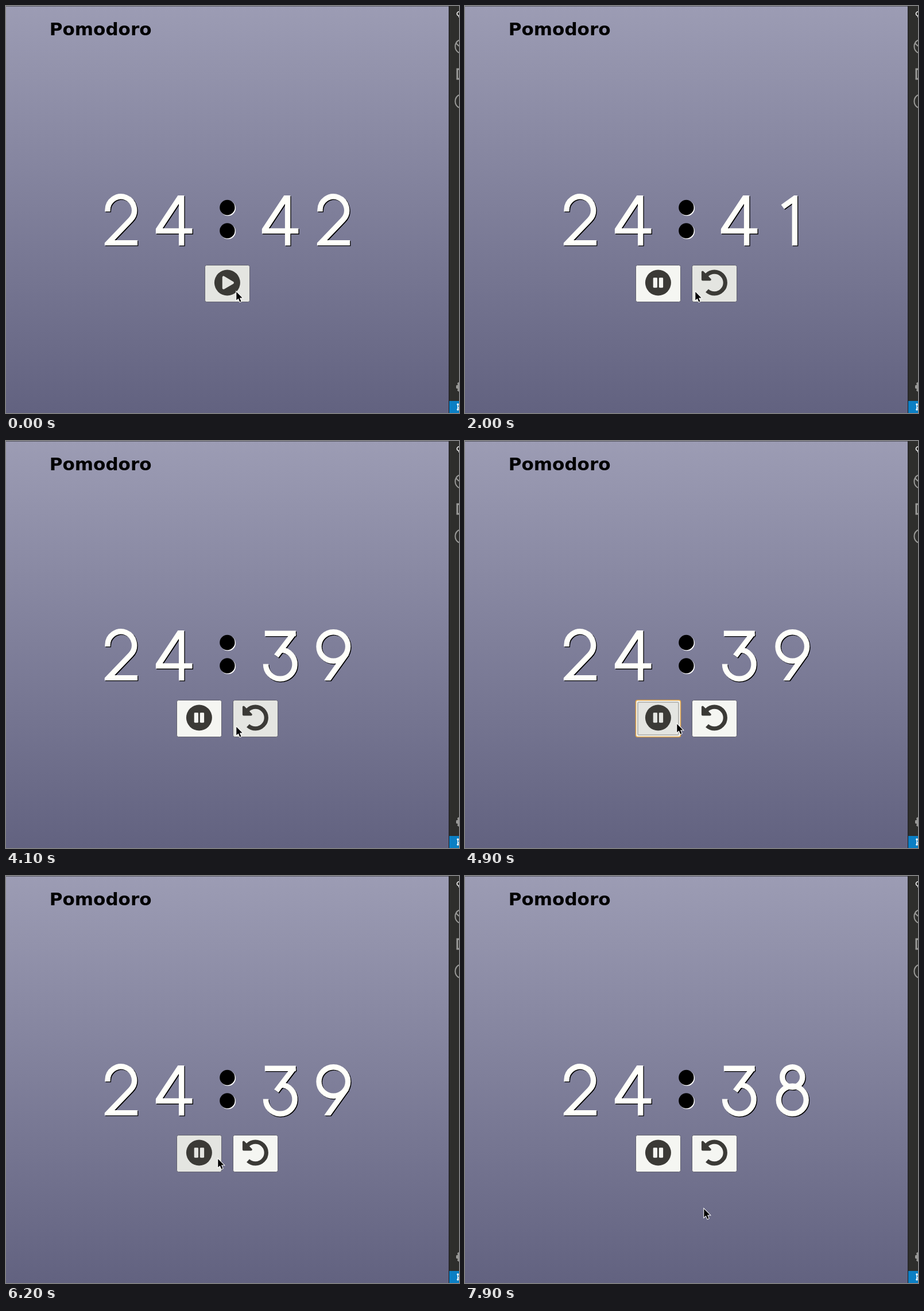
An HTML page with a canvas for the animation above (8 s loop, 789 by 709 pixels).

```html
<!DOCTYPE html>
<html lang="en">
<head>
<meta charset="utf-8">
<title>Pomodoro</title>
<style>
html, body { margin: 0; width: 100%; height: 100%; overflow: hidden; background: #626280; }
canvas { display: block; }
</style>
</head>
<body>
<canvas id="stage" width="789" height="709"></canvas>
<script>
const ctx = document.getElementById('stage').getContext('2d');
const LOOP = 8000, ICON = '#3b3a36', PLAIN = '#f5f6f2', HOVER = '#e4e5e1';

// Digits are stroked around x = 0; clip is [left, top, right, bottom].
const digits = {
  0: { d: 'M-26 355.5a26 22.7 0 0 1 52 0V392a26 22.7 0 0 1-52 0ZM-21 404L21 347' },
  1: { d: 'M-17 350L4 335V418', clip: [-20, 330, 10, 417.3] },
  2: { d: 'M-23.3 358V356.3A23.3 23.8 0 1 1 16.5 372.5L-22 412.6H29', clip: [-28.5, 320, 29, 417.3] },
  3: { d: 'M-27 335.3H27M24 334L-7 374.5M2 363.8A25.3 25.3 0 1 1-25.3 388.5' },
  4: { d: 'M32 391.9H-28.8L12.8 329V418', clip: [-32, 330, 31.7, 417.3] },
  8: { d: 'M17.5 350.3a17.5 17.5 0 1 1-35 0a17.5 17.5 0 1 1 35 0ZM24 390a24 24 0 1 1-48 0a24 24 0 1 1 48 0Z' },
  9: { d: 'M25.3 358a25.3 25.3 0 1 1-50.6 0a25.3 25.3 0 1 1 50.6 0ZM23 370L-12 419', clip: [-40, 320, 40, 417.3] }
};

const seconds = [[0, 42], [2000, 41], [3100, 40], [4100, 39], [7100, 38]];
const pointer = [
  [0, 401, 498], [4600, 376, 494], [4700, 369, 493],
  [6600, 376, 508], [6700, 389, 540], [6800, 403, 572], [6900, 411, 586],
  [7200, 412, 584], [7300, 413, 582], [7400, 414, 581], [7800, 415, 580], [7900, 416, 580]
];
const at = (steps, t) => steps.findLast(s => s[0] <= t);
const within = (t, a, b) => t >= a && t < b;

function rect(x, y, w, h, color) {
  ctx.fillStyle = color;
  ctx.fillRect(x, y, w, h);
}

function box(x, y, w, h, r, fill, line, width = 1) {
  ctx.beginPath();
  ctx.roundRect(x, y, w, h, r);
  if (fill) { ctx.fillStyle = fill; ctx.fill(); }
  if (line) { ctx.strokeStyle = line; ctx.lineWidth = width; ctx.stroke(); }
}

function disc(x, y, r, color) {
  ctx.fillStyle = color;
  ctx.beginPath();
  ctx.arc(x, y, r, 0, 7);
  ctx.fill();
}

function trace(d, color, width) {
  ctx.strokeStyle = color;
  ctx.lineWidth = width;
  ctx.stroke(new Path2D(d));
}

function shape(d, color) {
  ctx.fillStyle = color;
  ctx.fill(new Path2D(d));
}

function rounded(d, color, width) {
  ctx.lineJoin = 'round';
  shape(d, color);
  trace(d, color, width);
  ctx.lineJoin = 'miter';
}

function digit(n, x) {
  const { d, clip } = digits[n];
  for (const [shift, color] of [[1.3, '#000'], [0, '#fffffa']]) {
    ctx.save();
    ctx.translate(x + shift, shift);
    if (clip) {
      const [l, t, r, b] = clip;
      ctx.beginPath();
      ctx.rect(l, t, r - l, b - t);
      ctx.clip();
    }
    trace(d, color, 9.4);
    ctx.restore();
  }
}

function backdrop() {
  const g = ctx.createLinearGradient(0, 0, 0, 709);
  g.addColorStop(0, '#9c9cb4');
  g.addColorStop(1, '#626280');
  rect(0, 0, 771, 709, g);
  rect(0, 0, 771, 1, '#55555f');
  ctx.fillStyle = '#000';
  ctx.font = 'bold 31px "DejaVu Sans", sans-serif';
  ctx.fillText('Pomodoro', 75.8, 51);
}

function sidebar() {
  const grey = '#9a9a98';
  rect(771, 0, 18, 709, '#2e2e2c');
  rect(771, 0, 1, 709, '#1c1c20');
  rect(772, 688, 17, 21, '#0b7fc4');
  trace('M789 10a3.5 3.5 0 0 0 0 7V20', '#f4f4f4', 1.7);
  trace('M789 59.5a12.5 12.5 0 0 0 0 22M784 65L789 70', grey, 2);
  trace('M789 110H786V127H789', grey, 3);
  trace('M789 155a12.5 12.5 0 0 0 0 22', grey, 2);
  shape('M789 655L786 657L787 660L784 661V666L787 667L786 670L789 672Z', grey);
  trace('M787 694V703M787 700H789', '#fff', 1.5);
  disc(787, 694, 1.8, '#fff');
  disc(787, 703, 1.8, '#fff');
}

// Icons are drawn around the button's centre.
function button(x, icon, hover, focus) {
  const face = hover ? HOVER : PLAIN;
  box(x, 451.5, 78, 64, 3, face, '#62626f');
  if (focus) {
    box(x, 451.5, 78, 64, 3, PLAIN, '#e2a445', 1.5);
    box(x + 3.5, 455, 71, 57, 2, face, '#b9bab6', 2);
  }
  ctx.save();
  ctx.translate(x + 38.9, 482);
  icon(face);
  ctx.restore();
}

function play(face) {
  disc(0, 0, 22.5, ICON);
  rounded('M-6.5-9.4V9.4L9.4 .2Z', face, 4.3);
}

function pause(face) {
  disc(0, 0, 22.5, ICON);
  box(-8.7, -8.7, 7.25, 17.4, 1.4, face);
  box(1.45, -8.7, 7.25, 17.4, 1.4, face);
}

function reset() {
  ctx.strokeStyle = ICON;
  ctx.lineWidth = 7.25;
  ctx.beginPath();
  ctx.arc(0, 0, 18.9, -2.36, 2.32);
  ctx.stroke();
  rounded('M-20.6-18.6V-5.5H-7.5Z', ICON, 3.8);
}

function cursor(x, y) {
  const arrow = 'M0 0V14.5L3.4 11.4L6 17.5L8.2 16.5L5.7 10.6H10.3Z';
  ctx.save();
  ctx.translate(x + .3, y);
  trace(arrow, '#fff', 2);
  shape(arrow, '#000');
  ctx.restore();
}

function draw(now) {
  const t = now % LOOP;
  ctx.miterLimit = 10;
  backdrop();
  sidebar();

  const s = at(seconds, t)[1];
  digit(2, 200.3);
  digit(4, 292.9);
  for (const y of [351, 391.5]) {
    disc(386.8, y + 1.3, 13.2, '#fff');
    disc(385.4, y, 13.2, '#000');
  }
  digit(Math.floor(s / 10), 477.8);
  digit(s % 10, 570.3);

  const paused = within(t, 5500, 6100);
  if (t < 1000 || paused) {
    button(346.5, play, true, paused);
  } else {
    button(297.5, pause, within(t, 4600, 5500) || within(t, 6200, 6600), within(t, 4900, 5500));
    button(395.5, reset, within(t, 1100, 4400));
  }
  const [, x, y] = at(pointer, t);
  cursor(x, y);
}

let start;
function tick(now) {
  start ??= now;
  draw(now - start);
  requestAnimationFrame(tick);
}
requestAnimationFrame(tick);
</script>
</body>
</html>
```
